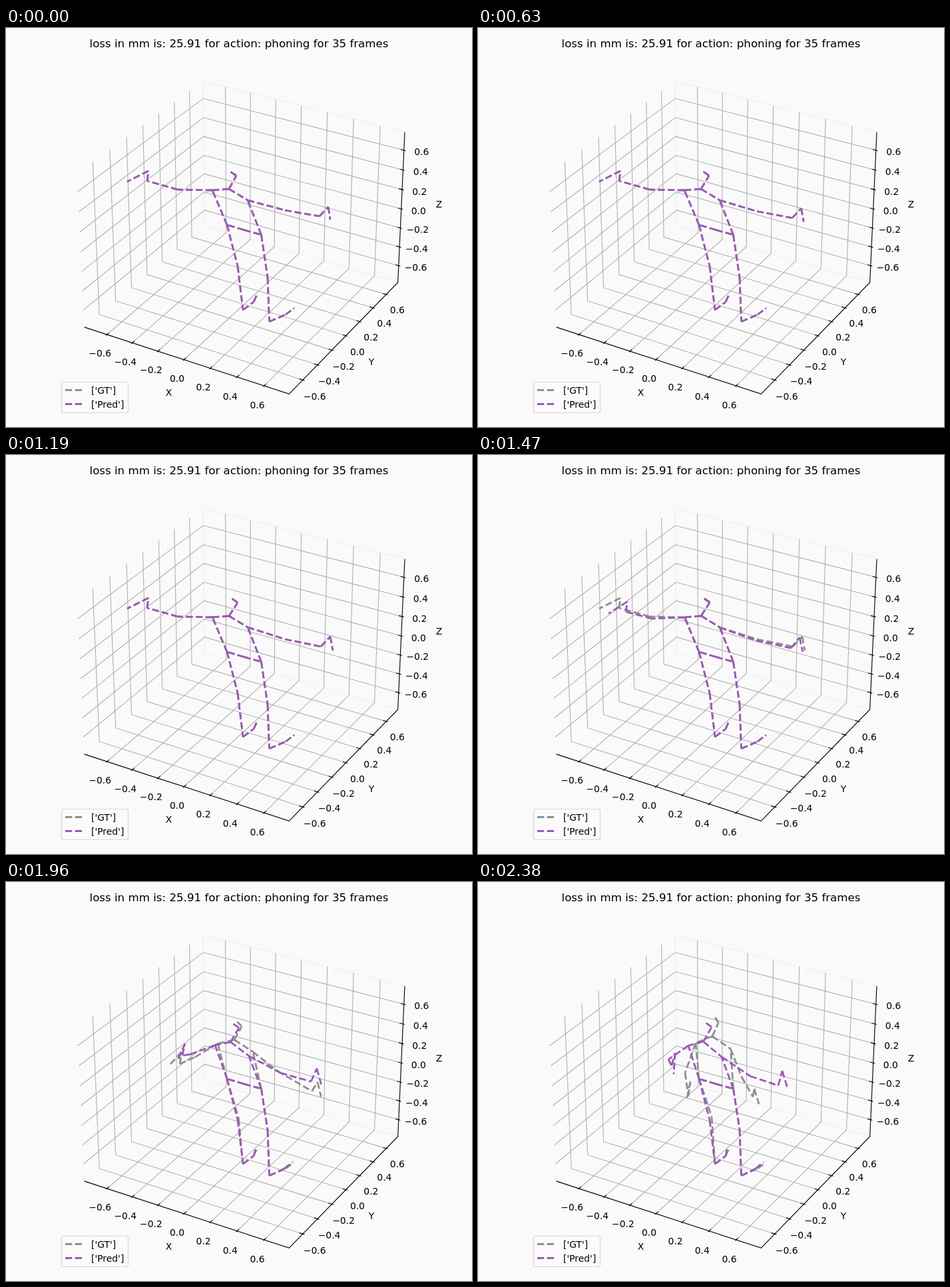
An HTML page for the animation above (2.45 s loop, 700 by 600 pixels).

```html
<!DOCTYPE html>
<html lang="en">
<head>
<meta charset="utf-8">
<title>Pose forecast</title>
<style>
  html, body { margin: 0; width: 100%; height: 100%; overflow: hidden; background: #fafafa; }
  svg { display: block; width: 700px; height: 600px; }
  text { font: 13.89px "DejaVu Sans", sans-serif; fill: #000; text-anchor: middle; }
  .title { font-size: 16.67px; }
  .legend { text-anchor: start; }
  path { fill: none; stroke-width: 1.11; }
  .pane { stroke: #eee; }
  .grid { stroke: #b0b0b0; }
  .axis { stroke: #000; }
  .gt, .pred { stroke-width: 2.78; stroke-dasharray: 10.28 4.44; }
  .gt { stroke: #8e8e8e; }
  .pred { stroke: #9b59b6; }
  rect { fill: #fbfbfb; stroke: #d5d5d5; stroke-width: 1.2; }
</style>
</head>
<body>
<svg viewBox="0 0 700 600"></svg>
<script>
const svg = document.querySelector('svg');
const STEP = 70, FRAMES = 35;

function add(tag, attrs, text = '') {
  const el = document.createElementNS('http://www.w3.org/2000/svg', tag);
  for (const key in attrs) el.setAttribute(key, attrs[key]);
  el.textContent = text;
  svg.append(el);
  return el;
}

// Perspective camera: elevation 30°, azimuth -60°, distance 10.
function project([x, y, z]) {
  x *= 0.7619; y *= 0.7619; z *= 0.5714;
  const scale = 2960 / (10 - (0.433 * x - 0.75 * y + 0.5 * z));
  return [
    357.5 + scale * (0.866 * x + 0.5 * y),
    303.7 - scale * (-0.25 * x + 0.433 * y + 0.866 * z)
  ];
}

const toPath = pts => 'M' + pts.map(p => p.map(v => v.toFixed(2)).join(' ')).join('L');
const line3d = (cls, ...pts) => add('path', { class: cls, d: toPath(pts.map(project)) });
const label = (text, x, y, cls = '') => add('text', { x, y: Math.round(y + 5), class: cls }, text);

function drawAxes() {
  const E = 0.78125, out = E + 0.0125, inn = E - 0.025, far = E + 0.088;
  const ticks = [-3, -2, -1, 0, 1, 2, 3].map(i => i / 5);
  const tickLabel = (v, pos) => {
    const [x, y] = project(pos);
    label(v.toFixed(1).replace('-', '\u2212'), x, y + 6);
  };

  line3d('pane', [-E, E, -E], [-E, E, E], [E, E, E], [E, E, -E], [-E, E, -E]);
  for (const v of ticks) {
    line3d('grid', [v, -E, -E], [v, E, -E], [v, E, E]);
    line3d('grid', [E, v, -E], [-E, v, -E], [-E, v, E]);
    line3d('grid', [-E, -E, v], [-E, E, v], [E, E, v]);
  }
  line3d('axis', [-E, -E, -E], [E, -E, -E], [E, E, -E], [E, E, E]);
  for (const v of ticks) {
    line3d('axis', [v, -out, -E], [v, -inn, -E]);
    line3d('axis', [out, v, -E], [inn, v, -E]);
    line3d('axis', [out, E, v], [inn, E, v]);
    tickLabel(v, [v, -far, -far]);
    tickLabel(v, [far, v, -far]);
    tickLabel(v, [far, far, v]);
  }
  label('X', 244.5, 548);
  label('Y', 549, 502);
  label('Z', 650.5, 265);
}

function drawLegend() {
  add('rect', { x: 83.5, y: 532.5, width: 100, height: 46, rx: 3 });
  [['gt', "['GT']", 544.5], ['pred', "['Pred']", 565.5]].forEach(([cls, text, y]) => {
    add('path', { class: cls, d: `M89 ${y}H116.8` });
    label(text, 128, y, 'legend');
  });
}

// Opening pose, with arms held out to the sides.
const rest = {
  root: [357.5, 303.7], neck: [335, 242], head: [346, 222], crown: [337, 216],
  lShoulder: [310, 244], lElbow: [258, 243], lWrist: [212, 230], lHand: [214, 215], lTip: [182, 231],
  rShoulder: [363, 259], rElbow: [419, 274], rWrist: [471, 283], rHand: [484, 269], rTip: [487, 288],
  lHip: [332, 296], lKnee: [348, 358], lAnkle: [356, 424], lFoot: [372, 412], lToe: [377, 401],
  rHip: [383.5, 311], rKnee: [393, 375], rAnkle: [395.5, 441.5], rFoot: [420, 431], rToe: [433, 421]
};

// Slow shift before the arms come down.
const drift = {
  head: [2, 0], crown: [2.5, 0],
  rElbow: [0, 3], rWrist: [2, 5], rHand: [3, 4], rTip: [4, 6]
};

// Closing poses; joints not named stay where they are.
const truth = {
  start: 21, length: 15, swing: [15, 10],
  end: {
    neck: [352, 232], head: [361, 212], crown: [356.5, 203.5],
    lShoulder: [327, 242], lElbow: [311, 287], lWrist: [316, 322], lHand: [319, 300], lTip: [313, 329],
    rShoulder: [379.5, 251], rElbow: [396, 293], rWrist: [413, 323], rHand: [415, 311], rTip: [422, 334],
    lKnee: [351, 353], rKnee: [393, 372], rToe: [431, 423]
  }
};
const guess = {
  start: 17, length: 18, swing: [0, 0],
  end: {
    neck: [338.5, 240], head: [351, 218], crown: [342.5, 212],
    lShoulder: [316, 246], lElbow: [286, 267], lWrist: [291, 276], lHand: [296, 257], lTip: [294, 289],
    rShoulder: [366, 263], rElbow: [409, 292], rWrist: [451, 306], rHand: [457, 284], rTip: [465, 310],
    lToe: [374, 401], rKnee: [393, 372], rFoot: [417, 431], rToe: [429, 421]
  }
};

const clamp = v => Math.min(1, Math.max(0, v));
const smooth = v => v * v * (3 - 2 * v);

function joint(pose, name, f) {
  const ease = t => smooth(clamp((t - pose.start) / pose.length));
  const s = ease(f) / ease(FRAMES - 1);
  const shift = clamp(f / 17);
  const arc = /^r(Wrist|Hand|Tip)/.test(name) ? Math.sin(Math.PI * s) : 0;
  return rest[name].map((v, i) => {
    const from = v + shift * (drift[name]?.[i] ?? 0);
    const to = pose.end[name]?.[i] ?? from;
    return from + (to - from) * s + pose.swing[i] * arc;
  });
}

// Every bone is its own dashed stroke.
const bones = [];
const chain = (names, side = '') =>
  names.split(' ').map(n => side + n).reduce((a, b) => (bones.push([a, b]), b));
chain('neck head crown');
for (const side of ['l', 'r']) {
  bones.push(['root', side + 'Hip'], ['neck', side + 'Shoulder']);
  chain('Hip Knee Ankle Foot Toe', side);
  chain('Hip Shoulder Elbow Wrist Hand Tip', side);
}

const posePath = (pose, f) =>
  bones.map(ends => toPath(ends.map(name => joint(pose, name, f)))).join('');

drawAxes();
label('loss in mm is: 25.91 for action: phoning for 35 frames', 350, 24, 'title');
const truthEl = add('path', { class: 'gt' });
const guessEl = add('path', { class: 'pred' });
drawLegend();

let shown = -1;
function tick() {
  const f = Math.floor(performance.now() / STEP) % FRAMES;
  if (f !== shown) {
    shown = f;
    truthEl.setAttribute('d', posePath(truth, f));
    guessEl.setAttribute('d', posePath(guess, f));
  }
  requestAnimationFrame(tick);
}
tick();
</script>
</body>
</html>
```
